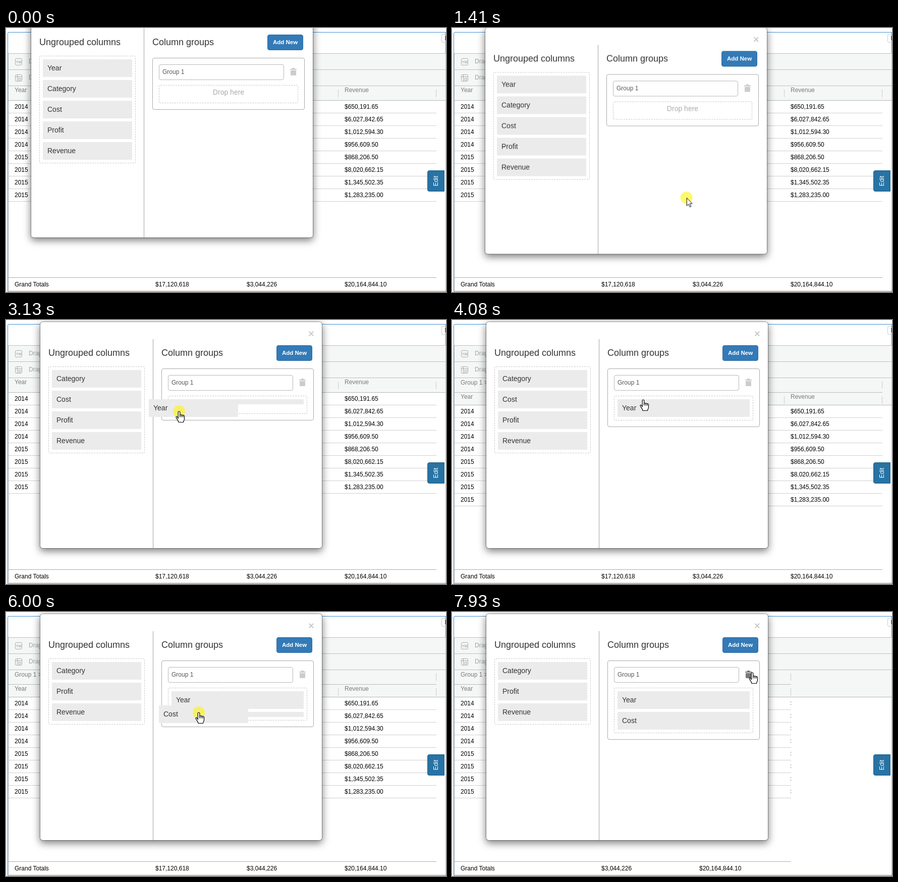
Write an HTML page that moves like this. It is 872 px wide and 523 px high and loops after 8000 ms.

```html
<!DOCTYPE html>
<html lang="en">
<head>
<meta charset="utf-8">
<title>Column groups</title>
<style>
html, body { margin: 0; width: 100%; height: 100%; overflow: hidden; background: #fff; }
#stage { position: relative; width: 872px; height: 523px; overflow: hidden; font: 12px/16px "Liberation Sans", Arial, sans-serif; color: #000; white-space: nowrap; }
#stage div, #stage span, #stage svg { position: absolute; box-sizing: border-box; }
.anim { animation: 8s step-end -10ms infinite; }
.path { animation: 8s step-start -10ms infinite; }

/* table */
#frame { left: 3px; top: 8px; width: 869px; height: 515px; border: 1px solid #428fd0; border-radius: 3px 0 0 0; }
#inner { left: 4px; top: 50px; width: 868px; height: 471px; border: 1px solid #c4c4c4; }
.band { left: 5px; width: 866px; height: 33px; background: #f5f7f7; border-top: 1px solid #bdbfbf; border-bottom: 1px solid #bdbfbf; color: #a3a3a3; }
.band span { left: 40px; top: 7px; }
#head { left: 5px; top: 115px; width: 866px; height: 29px; background: #f5f7f7; border-bottom: 1px solid #b4b6b6; color: #7b7b75; animation-name: head; }
.wide { left: 5px; width: 848px; overflow: hidden; animation-name: narrow; }
#groupRow { top: 114px; height: 30px; border-bottom: 1px solid #b9bbbb; color: #7b7b75; animation-name: narrow, grouped; }
#headRow { top: 115px; height: 28px; color: #7b7b75; animation-name: narrow, headDown; }
.tick { right: 0; top: 7px; width: 1px; height: 15px; background: #c9cbcb; }
#rev { left: 653px; top: 0; width: 120px; height: 28px; animation-name: untilFinal; }
#rev .tick { left: 0; }
#rows { top: 144px; height: 200px; animation-name: narrow, rowsDown; }
#rows div { left: 0; width: 100%; height: 25px; border-bottom: 1px solid #d0d0d0; line-height: 24px; }
#rows span, #totals span { left: 12px; }
#rows span + span { left: 666px; }
#totals { top: 494px; height: 26px; border-top: 1px solid #adadad; line-height: 26px; }
#totals div { width: 100%; height: 100%; }
#before { animation-name: untilFinal; }
#after { animation-name: final; }
#menu { left: 863px; top: 12px; width: 20px; height: 17px; border: 1px solid #ccc; border-radius: 3px; }
#menu:after { content: ""; position: absolute; left: 6px; top: 3px; width: 2px; height: 2px; background: #444; box-shadow: 0 3px #444, 0 6px #444; }
#edit { left: 835px; top: 282px; width: 34px; height: 42px; background: #2873a3; border: 1px solid #1e608c; border-radius: 4px 0 0 4px; }
#edit span { left: 0; top: 12px; width: 32px; text-align: center; color: #fff; transform: rotate(-90deg); }

/* dialog */
#modal { left: 67px; top: 3px; width: 560px; height: 450px; background: #fff; background-clip: padding-box; border: 1px solid rgba(0,0,0,.35); border-radius: 6px; box-shadow: 0 5px 15px rgba(0,0,0,.5); color: #333; animation-name: modalDrag; }
#modal h2 { position: absolute; margin: 0; top: 50px; font: 18px/22px "Liberation Sans", Arial, sans-serif; }
#divider { left: 223px; top: 34px; width: 1px; height: 414px; background: #a2a2a2; }
#close { left: 531px; top: 13px; font: bold 20px/20px "Liberation Sans", Arial, sans-serif; color: #ccc; }
#add { left: 468px; top: 46px; width: 71px; height: 31px; background: #337ab7; border: 1px solid #2e6da4; border-radius: 4px; color: #fff; font: bold 11.5px/29px "Liberation Sans", Arial, sans-serif; text-align: center; }
.list { border: 1px dashed #c8c8c8; border-radius: 3px; padding: 6px 6px 0; }
#stage .item { position: relative; height: 35px; margin-bottom: 6px; padding-left: 9px; overflow: hidden; background: #ebebeb; color: #333; font-size: 14px; line-height: 35px; }
#left { left: 16px; top: 88px; width: 191px; }
#panel { left: 240px; top: 92px; width: 302px; padding: 53px 12px 12px; border: 1px solid #aaa; border-radius: 4px; }
#stage #target { position: relative; min-height: 36px; }
#input { left: 12px; top: 12px; width: 248px; height: 31px; border: 1px solid #b8b8b8; border-radius: 4px; padding-left: 6px; line-height: 29px; color: #555; }
#drop { left: 0; top: 5px; width: 100%; text-align: center; font-size: 14px; color: #aaa; animation-name: empty; }
#trash { left: 272px; top: 19px; color: #ccc; animation-name: trashHover; }
#leftYear { animation-name: yearOut; }
#leftCost { animation-name: costOut; }
#stage #groupYear { animation-name: yearIn; }
#stage #groupCost { animation-name: costIn; }

/* dragged items and pointer */
#stage .ghost { position: absolute; left: 0; top: 0; width: 177px; margin: 0; animation: 8s -10ms infinite; animation-timing-function: step-start, step-end; }
#ghostYear { animation-name: yearPath, yearShown !important; }
#stage #ghostYear { animation-name: yearPath, yearShown; }
#stage #ghostCost { animation-name: costPath, costShown; }
#pointer { left: 0; top: 0; width: 0; height: 0; animation: 8s -10ms infinite; animation-name: pointerPath, enter; animation-timing-function: step-start, step-end; }
#pointer svg { left: -20px; top: -20px; }
#click { animation-name: click; }
#arrow { animation-name: arrow; }
#hand { animation-name: hand; }

@keyframes modalDrag {
  0%, 14.125% { transform: translate(-18px, -37px); }
  15% { transform: translate(-14px, -30px); }
  15.875% { transform: translate(-8px, -18px); animation-timing-function: steps(4, start); }
  19.375%, 100% { transform: none; }
}
@keyframes pointerPath {
  0%, 5% { transform: translate(640px, 497px); animation-timing-function: steps(7, start); }
  11.75%, 14.125% { transform: translate(443px, 301px); }
  15% { transform: translate(452px, 316px); }
  15.875% { transform: translate(461px, 331px); animation-timing-function: steps(4, start); }
  19.375%, 21% { transform: translate(466px, 338px); animation-timing-function: steps(9, start); }
  28.875% { transform: translate(132px, 96px); }
  29.75% { transform: translate(110px, 91px); }
  30.625% { transform: translate(93px, 100px); }
  31.375% { transform: translate(131px, 107px); }
  32.25% { transform: translate(130px, 113px); }
  33.125%, 37.25% { transform: translate(127px, 111px); }
  38.125% { transform: translate(160px, 125px); }
  39.125% { transform: translate(250px, 155px); }
  40% { transform: translate(343px, 181px); animation-timing-function: steps(6, start); }
  45.25%, 51.875% { transform: translate(379px, 158px); animation-timing-function: steps(10, start); }
  60.75%, 62.25% { transform: translate(168px, 157px); }
  63%, 68% { transform: translate(168px, 154px); animation-timing-function: steps(9, start); }
  75.875% { transform: translate(382px, 199px); animation-timing-function: steps(3, start); }
  78.5% { transform: translate(398px, 204px); animation-timing-function: steps(2, start); }
  80.25%, 88.625% { transform: translate(415px, 208px); animation-timing-function: steps(9, start); }
  96.5% { transform: translate(613px, 122px); animation-timing-function: steps(2, start); }
  98.25% { transform: translate(600px, 121px); }
  99.125%, 100% { transform: translate(595px, 120px); }
}
@keyframes yearPath {
  0%, 37.25% { transform: translate(91px, 99px); }
  38.125% { transform: translate(100px, 103px); }
  39.125% { transform: translate(190px, 130px); }
  40% { transform: translate(283px, 157px); animation-timing-function: steps(6, start); }
  45.25%, 100% { transform: translate(342px, 146px); }
}
@keyframes costPath {
  0%, 68% { transform: translate(91px, 140px); animation-timing-function: steps(9, start); }
  75.875% { transform: translate(303px, 185px); animation-timing-function: steps(3, start); }
  78.5% { transform: translate(320px, 190px); animation-timing-function: steps(2, start); }
  80.25%, 100% { transform: translate(338px, 194px); }
}
@keyframes enter { 0% { opacity: 0; } 5%, 100% { opacity: 1; } }
@keyframes yearShown { 0%, 47.75%, 100% { opacity: 0; } 37.25% { opacity: 1; } }
@keyframes costShown { 0%, 80.25%, 100% { opacity: 0; } 68% { opacity: 1; } }
@keyframes click { 0%, 21%, 46.875%, 79.375%, 100% { opacity: 0; } 10.78%, 34.75%, 64.75% { opacity: 1; } }
@keyframes hand { 0%, 53.65%, 93.9% { opacity: 0; } 29.75%, 56.3%, 98.25%, 100% { opacity: 1; } }
@keyframes arrow { 0%, 53.65%, 93.9% { opacity: 1; } 29.75%, 56.3%, 98.25%, 100% { opacity: 0; } }
@keyframes yearOut { 0% { height: 35px; margin-bottom: 6px; } 37.25% { height: 10px; margin-bottom: 6px; } 39.125%, 100% { height: 0; margin-bottom: 0; } }
@keyframes costOut { 0% { height: 35px; margin-bottom: 6px; } 68% { height: 10px; margin-bottom: 6px; } 73.25%, 100% { height: 0; margin-bottom: 0; } }
@keyframes yearIn { 0% { height: 0; margin-bottom: 0; } 39.125% { height: 10px; margin-bottom: 6px; } 51%, 100% { height: 35px; margin-bottom: 6px; } }
@keyframes costIn { 0% { height: 0; margin-bottom: 0; } 73.25% { height: 10px; margin-bottom: 6px; } 83.625%, 100% { height: 35px; margin-bottom: 6px; } }
@keyframes empty { 0% { opacity: 1; } 39.125%, 100% { opacity: 0; } }
@keyframes trashHover { 0% { color: #ccc; } 99.125%, 100% { color: #777; } }
@keyframes head { 0% { height: 29px; } 51%, 100% { height: 54px; } }
@keyframes grouped { 0% { opacity: 0; } 51%, 100% { opacity: 1; } }
@keyframes headDown { 0% { transform: none; } 51%, 100% { transform: translateY(29px); } }
@keyframes rowsDown { 0% { transform: none; } 51%, 100% { transform: translateY(25px); } }
@keyframes narrow { 0% { width: 848px; } 83.625%, 100% { width: 667px; } }
@keyframes untilFinal { 0% { opacity: 1; } 83.625%, 100% { opacity: 0; } }
@keyframes final { 0% { opacity: 0; } 83.625%, 100% { opacity: 1; } }
</style>
</head>
<body>
<div id="stage">
  <div id="frame"></div>
  <div id="inner"></div>
  <div id="menu"></div>
  <div class="band" style="top:50px"><span>Drag here</span></div>
  <div class="band" style="top:82px"><span>Drag here</span></div>
  <svg style="left:18px;top:60px" width="15" height="46" fill="none" stroke="#a9a9a9">
    <rect x=".5" y=".5" width="13" height="13" rx="2"/>
    <path d="M2.5 5l1.5 2 1.5-2M4 7v3M7.500 5v5M9.500 5v5M11.500 5v5"/>
    <rect x=".5" y="32.500" width="13" height="13" rx="2"/>
    <path d="M4.500 32v13M.5 36.500h13M7 39.500h4v4H7z"/>
  </svg>
  <div id="head" class="anim"></div>
  <div id="groupRow" class="wide anim"><span style="left:12px;top:2px">Group 1 &gt;</span><div class="tick"></div></div>
  <div id="headRow" class="wide anim">
    <span style="left:12px">Year</span>
    <div id="rev" class="anim"><span style="left:13px">Revenue</span><div class="tick"></div></div>
    <div class="tick"></div>
  </div>
  <div id="rows" class="wide anim"></div>
  <div id="totals" class="wide anim">
    <span>Grand Totals</span>
    <div id="before" class="anim"><span style="left:291px">$17,120,618</span><span style="left:472px">$3,044,226</span><span style="left:666px">$20,164,844.10</span></div>
    <div id="after" class="anim"><span style="left:291px">$3,044,226</span><span style="left:485px">$20,164,844.10</span></div>
  </div>
  <div id="edit"><span>Edit</span></div>

  <div id="modal" class="path">
    <div id="close">×</div>
    <h2 style="left:16px">Ungrouped columns</h2>
    <h2 style="left:240px">Column groups</h2>
    <div id="divider"></div>
    <div id="add">Add New</div>
    <div id="left" class="list">
      <div id="leftYear" class="item anim">Year</div>
      <div class="item">Category</div>
      <div id="leftCost" class="item anim">Cost</div>
      <div class="item">Profit</div>
      <div class="item">Revenue</div>
    </div>
    <div id="panel">
      <div id="input">Group 1</div>
      <svg id="trash" class="anim" width="13" height="16" fill="currentColor"><path d="M4 0h5v2h4v2H0V2h4zM1 5h11v9q0 1-1 1H2q-1 0-1-1z"/></svg>
      <div id="target" class="list">
        <div id="drop" class="anim">Drop here</div>
        <div id="groupYear" class="item anim">Year</div>
        <div id="groupCost" class="item anim">Cost</div>
      </div>
    </div>
  </div>

  <div id="ghostYear" class="item ghost">Year</div>
  <div id="ghostCost" class="item ghost">Cost</div>
  <div id="pointer">
    <svg width="50" height="50" viewBox="-20 -20 50 50" stroke-linejoin="round">
      <circle id="click" class="anim" r="12" fill="#fff314" fill-opacity=".62"/>
      <path id="arrow" class="anim" d="M.5 .5V16L4 12.800 6.500 18.500 9 17.500 6.500 11.800H11.500Z" fill="#fff" stroke="#000"/>
      <g id="hand" class="anim" fill="#fff" stroke="#000" stroke-width="1.200">
        <path d="M-1.800 14V1.800a1.800 1.800 0 0 1 3.600 0V8c0-2 3-2 3 .2 0-1.800 3-1.500 3 .5 0-1.600 2.700-1.200 2.700.6V15c0 3-2 4-2 6.500H-1C-1 18-6 14-6 11.500c0-1.600 2-1.600 3 .2z"/>
        <path d="M1.800 8v3.500M4.800 8.200v3.300M7.800 8.700v3" fill="none"/>
      </g>
    </svg>
  </div>
</div>
<script>
const revenue = ["650,191.65", "6,027,842.65", "1,012,594.30", "956,609.50", "868,206.50", "8,020,662.15", "1,345,502.35", "1,283,235.00"];
document.getElementById("rows").innerHTML = revenue.map((value, i) =>
  `<div style="top:${i * 25}px"><span>${i < 4 ? 2014 : 2015}</span><span>$${value}</span></div>`).join("");
</script>
</body>
</html>
```
